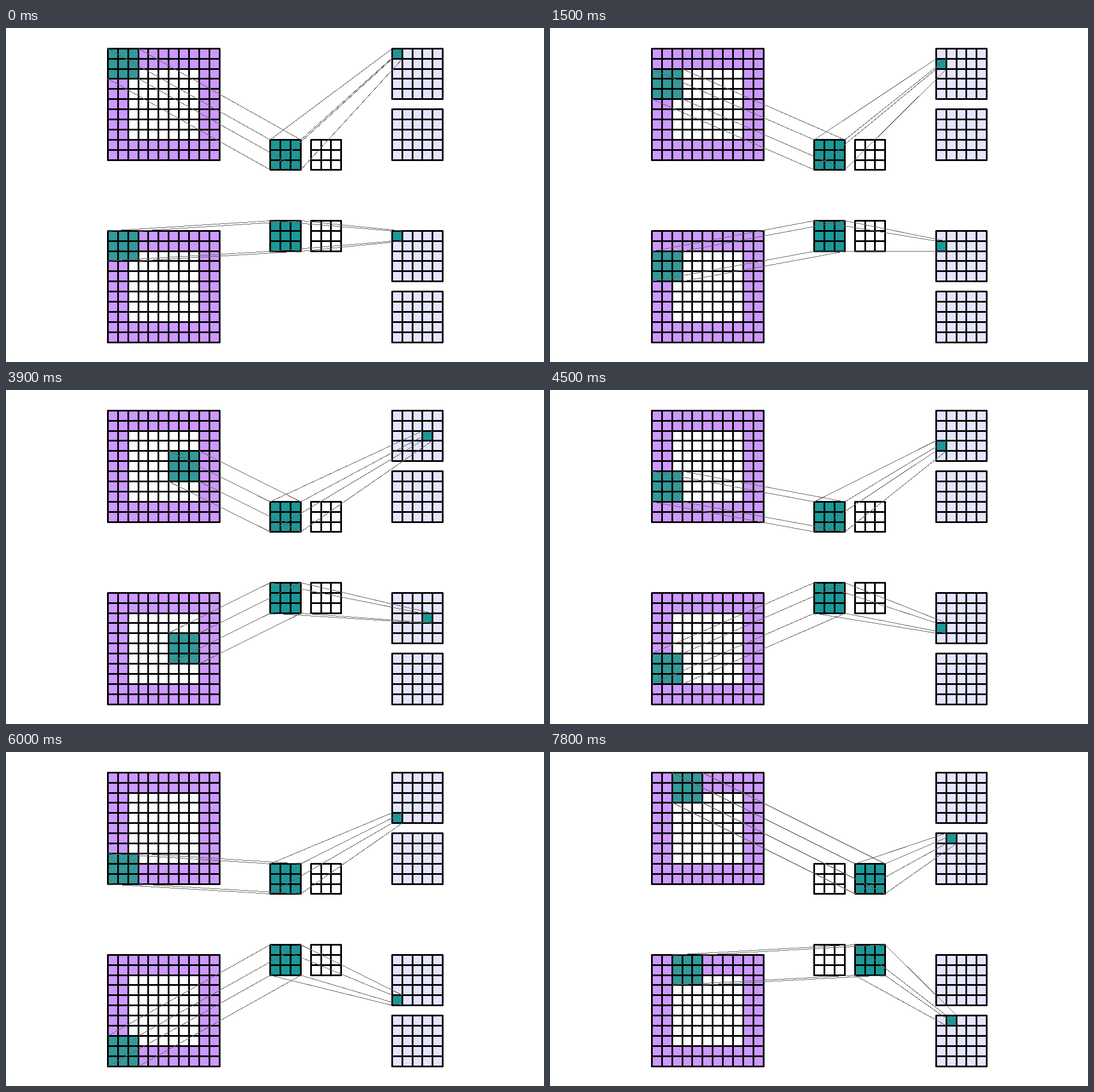
Write an HTML page that moves like this. It is 948 px wide and 590 px high and loops after 8 s.

```html
<!DOCTYPE html>
<html lang="en">
<head>
<meta charset="utf-8">
<title>Strided convolution</title>
<style>
  html, body { margin: 0; width: 100%; height: 100%; overflow: hidden; background: #fff; }
  svg { display: block; width: 948px; height: 590px; }
  .grid { fill: none; stroke: #000; stroke-width: 3; stroke-linejoin: round; stroke-linecap: round; }
  .ray { stroke: #666; stroke-width: 1; shape-rendering: crispEdges; }
</style>
</head>
<body>
<svg id="stage" viewBox="0 0 948 590">
  <g id="fills"></g>
  <g id="marks"></g>
  <g id="grids"></g>
  <g id="rays"></g>
</svg>
<script>
const UNIT = 17.89, STEP = 300, LOOP = 8000;
const SIZE = 5, STRIDE = 2, KERNEL = 3;
const PURPLE = '#cc99ff', LAVENDER = '#e5e5ff', TEAL = '#1a9999', SHADE = '#339999';

// Positions are in grid units; each half holds one input channel.
const INPUT_X = 10, FILTER_X = [26, 30], OUTPUT_X = 38;
const HALVES = [
  { input: 2, filter: 11, outputs: [2, 8] },
  { input: 20, filter: 19, outputs: [20, 26] }
];

const px = k => Math.round(k * UNIT) + 0.5;
const layer = id => document.getElementById(id);

function add(parent, tag, attrs) {
  const el = document.createElementNS('http://www.w3.org/2000/svg', tag);
  set(el, attrs);
  parent.appendChild(el);
  return el;
}

function set(el, attrs) {
  for (const name in attrs) el.setAttribute(name, attrs[name]);
}

const box = (x, y, n) => ({
  x: px(x), y: px(y), width: px(x + n) - px(x), height: px(y + n) - px(y)
});

function square(x, y, n, fill) {
  add(layer('fills'), 'rect', { ...box(x, y, n), fill });
}

function grid(x, y, n) {
  let d = '';
  for (let i = 1; i < n; i++) {
    d += `M${px(x + i)} ${px(y)}V${px(y + n)}M${px(x)} ${px(y + i)}H${px(x + n)}`;
  }
  add(layer('grids'), 'path', { d, class: 'grid' });
  add(layer('grids'), 'rect', { ...box(x, y, n), class: 'grid' });
}

const mark = fill => add(layer('marks'), 'rect', { fill });
const rays = () => Array.from({ length: 4 }, () => add(layer('rays'), 'line', { class: 'ray' }));

// Joins matching corners of two squares, each given as [x, y, size].
function join(lines, [ax, ay, an], [bx, by, bn]) {
  lines.forEach((line, i) => {
    const u = i % 2, v = i >> 1;
    set(line, {
      x1: px(ax + u * an), y1: px(ay + v * an),
      x2: px(bx + u * bn), y2: px(by + v * bn)
    });
  });
}

for (const half of HALVES) {
  square(INPUT_X, half.input, 11, PURPLE);
  square(INPUT_X + 2, half.input + 2, 7, '#fff');
  grid(INPUT_X, half.input, 11);
  for (const x of FILTER_X) grid(x, half.filter, KERNEL);
  for (const y of half.outputs) {
    square(OUTPUT_X, y, SIZE, LAVENDER);
    grid(OUTPUT_X, y, SIZE);
  }
  half.marks = [mark(SHADE), mark(TEAL), mark(TEAL)];
  half.rays = [rays(), rays()];
}

let shown = -1;

function render(time) {
  const step = Math.floor((time % LOOP) / STEP);
  if (step === shown) return;
  shown = step;
  const col = step % SIZE;
  const row = Math.floor(step / SIZE) % SIZE;
  const pass = Math.floor(step / (SIZE * SIZE));
  for (const half of HALVES) {
    const areas = [
      [INPUT_X + col * STRIDE, half.input + row * STRIDE, KERNEL],
      [FILTER_X[pass], half.filter, KERNEL],
      [OUTPUT_X + col, half.outputs[pass] + row, 1]
    ];
    areas.forEach((area, i) => set(half.marks[i], box(...area)));
    half.rays.forEach((lines, i) => join(lines, areas[i], areas[i + 1]));
  }
}

const start = performance.now();
function tick() {
  render(performance.now() - start);
  requestAnimationFrame(tick);
}
tick();
</script>
</body>
</html>
```
